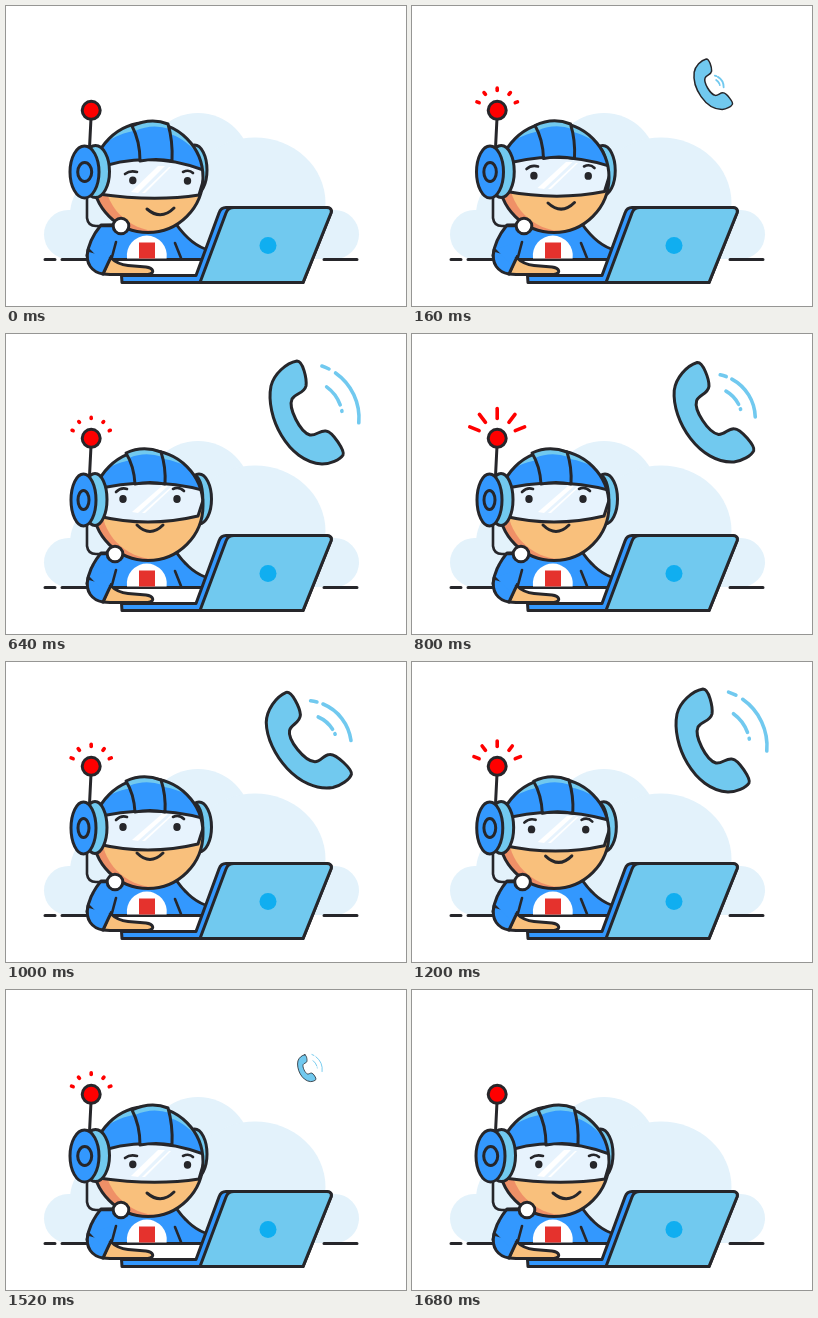
Recreate the animation shown at these times as an HTML page. Size 400 px wide and 300 px high, loop 1800 ms.

```html
<!DOCTYPE html>
<html lang="en">
<head>
<meta charset="utf-8">
<title>Incoming call</title>
<style>
  html, body { margin: 0; width: 100%; height: 100%; overflow: hidden; background: #fff; }
  svg { display: block; width: 400px; height: 300px; }
  .ink { stroke: #26262a; stroke-width: 3; stroke-linecap: round; stroke-linejoin: round; }
  .line { fill: none; }
  .blue { fill: #3398fe; }
  .sky { fill: #71c9ef; }
  .skin { fill: #f9c07c; }
  .shade { fill: #ef9067; }
  .white { fill: #fff; }
  .dark { fill: #26262a; }
  .visor { fill: #e7f3fd; }
  .thin { stroke-width: 2.6; }
  #cloud { fill: #e3f2fb; }
  #rays { stroke: #f00; stroke-width: 3.6; stroke-linecap: round; }
  #waves { fill: none; stroke: #71c9ef; stroke-width: 3.6; stroke-linecap: round; }
</style>
</head>
<body>
<svg viewBox="0 0 400 300">
  <defs>
    <clipPath id="headClip"><circle cx="142" cy="171.5" r="55"/></clipPath>
  </defs>

  <g id="cloud">
    <circle cx="192" cy="160" r="53"/>
    <ellipse cx="249" cy="197" rx="70.5" ry="65.5"/>
    <circle cx="109" cy="209" r="45"/>
    <rect x="38" y="204" width="315" height="49" rx="24.5"/>
    <path d="M105 165h150v88h-150z"/>
  </g>
  <path class="white" d="M90 253h140v20h-140z"/>
  <path class="ink line" d="M39 253.4h10M56 253.4h34M318 253.4h33"/>

  <g id="body">
    <path class="ink blue" d="M95 219C86 230 82 239 81 250L104 253.4H203V244C190 241 180 232 170 218Z"/>
    <path class="white" d="M121 252.4a20 20 0 1 1 39.6 0z"/>
    <rect x="133" y="236.5" width="16" height="16" fill="#e5322d"/>
    <path class="ink line thin" d="M110 236L106 251M169 237L175 252"/>
    <path class="ink skin" d="M97 268L104 251C110 257 116 259 122 259.5L140 261C147 262 150 267 142 268.5H104Z"/>
    <path class="ink blue" d="M82 244C79 258 86 266 97 268L105 251Z"/>
    <path class="blue" d="M84 243L105 236L104 250L98 258Z"/>
  </g>

  <g id="laptop">
    <path class="ink blue" d="M115.5 269.5H190L213 207Q215 201.6 220 201.6H321Q326.500 202 325 207L297 276.600H116Z"/>
    <path class="ink sky" d="M194 276.600L220 207Q222 201.6 228 201.6H321Q326.500 202 325 207L297 276.600Z"/>
    <circle cx="262" cy="239.5" r="8.5" fill="#10aef0"/>
  </g>

  <g id="head"></g>
  <g id="rays"></g>

  <g id="call">
    <g id="waves"></g>
    <path class="ink sky" d="M291 27C280 29 268 40 265 52C259 82 282 128 316 130C324 130 334 126 337 121C339 117 327 98 320 97C314 96 310 102 304 101C294 98 282 74 286 65C289 59 298 60 300 52C301 45 297 27 291 27Z"/>
  </g>
</svg>
<script>
const $ = id => document.getElementById(id);
const LOOP = 1800, STEP = 40;

// Eased value at time t from [time, value] keys.
function track(keys, t) {
  let i = 0;
  while (i < keys.length - 2 && t > keys[i + 1][0]) i++;
  const [t0, a] = keys[i], [t1, b] = keys[i + 1];
  const u = Math.min(1, Math.max(0, (t - t0) / (t1 - t0)));
  return a + (b - a) * u * u * (3 - 2 * u);
}

// Mixes two paths of equal structure; arc flags must stay plain 0 or 1.
function blend(front, turned, k) {
  const to = turned.match(/-?[\d.]+/g);
  let i = 0;
  return front.replace(/-?[\d.]+/g, n => Math.round((+n + (to[i++] - n) * k) * 100) / 100);
}

const ellipse = (cx, cy, rx, ry) =>
  `M${cx - rx} ${cy}A${rx} ${ry} 0 1 1 ${cx + rx} ${cy}A${rx} ${ry} 0 1 1 ${cx - rx} ${cy}Z`;

const skull = ellipse(142, 171.5, 55, 55);
const ridgeFront = 'M120 119Q137 111 155 118Q160 133 159 150Q144 147 129 150Q128 132 120 119Z';
const ridgeTurned = 'M126 120Q145 111 162 118Q167 135 166 155Q150 152 134 155Q134 135 126 120Z';

// [class, front path, turned path, clipped to the head]
const headParts = [
  ['ink sky', ellipse(193, 165, 12.5, 25), ellipse(188.5, 164, 12.5, 25)],
  ['ink blue thin', ellipse(188, 165, 9, 24), ellipse(183, 164, 9, 24)],
  ['ink line', 'M85 112L83.5 142', 'M85 112L83.5 142'],
  ['shade', skull, skull, true],
  ['skin', ellipse(149, 169, 54, 56), ellipse(152, 169, 54, 56), true],
  ['sky', 'M80 110H205V157Q142 141 80 157Z', 'M80 110H205V165Q141 142 80 165Z', true],
  ['blue', 'M80 157C96 116 188 110 200 157Q142 141 80 157Z',
           'M80 165C96 112 182 108 200 165Q141 142 80 165Z', true],
  ['ink visor', 'M84 157Q142 141 200 157L192 182Q142 194 92 182Z',
                'M84 165Q141 142 200 165L193 189Q148 196 92 188Z', true],
  ['white', 'M126 178L156 152H162L132 179Z', 'M125 186L152 160H159L132 187Z', true],
  ['white', 'M136 179L165 153H167L139 179Z', 'M136 187L163 161H165L139 187Z', true],
  ['ink line', skull, skull],
  ['blue', ridgeFront, ridgeTurned],
  ['sky', 'M120 119Q137 111 155 118L157 123Q139 117 123 124Z',
          'M126 120Q145 111 162 118L164 123Q146 117 129 125Z'],
  ['ink line', ridgeFront, ridgeTurned],
  ['dark', ellipse(117, 165, 3.7, 3.9), ellipse(126.8, 174.3, 3.7, 3.9)],
  ['dark', ellipse(171, 165, 3.7, 3.9), ellipse(181.5, 174.8, 3.7, 3.9)],
  ['ink line thin', 'M110 158Q115 153 121 155M167 155Q173 152 178 157',
                    'M119 168Q124 164 131 166M177 166Q183 163 187 167'],
  ['ink line', 'M131 191Q144 204 157 191', 'M141 203Q155 215 168 202'],
  ['ink sky', ellipse(89, 165.5, 12, 26), ellipse(89.5, 165.5, 14, 26)],
  ['ink blue', ellipse(77.5, 166, 12.5, 26), ellipse(78.5, 166, 14.5, 26)],
  ['ink line', ellipse(77.5, 166, 5.5, 9.5), ellipse(78.7, 166, 7, 9.5)],
  ['ink line thin', 'M81 192V212Q82 220 90 220H102', 'M81 192V212Q82 220 90 220H108'],
  ['ink white', ellipse(109, 220, 7.8, 7.8), ellipse(115, 220, 7.8, 7.8)],
];

$('head').innerHTML = headParts.map(([cls, , , clip]) =>
  `<g${clip ? ' clip-path="url(#headClip)"' : ''}><path class="${cls}"/></g>`).join('') +
  '<circle class="ink" cx="85.2" cy="104.3" r="9" fill="#f00"/>';
const headPaths = $('head').querySelectorAll('path');

const turnKeys = [[0, 1], [40, 1], [280, 0], [1120, 0], [1360, 1]];
const rayKeys = [[80, 0], [320, 11], [580, 0], [830, 11], [1080, 0], [1290, 10], [1360, 8.5], [1600, 0]];
const sizeKeys = [[40, 0], [280, 1], [1280, 1], [1640, 0]];
const tiltKeys = [[80, 0], [310, -14], [580, 0], [650, 0], [960, -14], [1080, -8], [1200, 0], [1360, 2]];
const waveKeys = [[80, 20], [320, 35], [600, 55], [640, 55], [940, 36], [1000, 46], [1200, 57], [1360, 62]];

const polar = (cx, cy, r, deg) => {
  const a = deg * Math.PI / 180;
  return `${(cx + r * Math.cos(a)).toFixed(2)} ${(cy + r * Math.sin(a)).toFixed(2)}`;
};
const arc = (r, from, to) => `M${polar(298, 84, r, from)}A${r} ${r} 0 0 1 ${polar(298, 84, r, to)}`;

function draw(t) {
  const turn = track(turnKeys, t);
  headParts.forEach(([, front, turned], i) => headPaths[i].setAttribute('d', blend(front, turned, turn)));

  const len = track(rayKeys, t);
  $('rays').innerHTML = len < .3 ? '' : [202, 233, 270, 307, 338].map(a =>
    `<path d="M${polar(85.2, 104, 19.5, a)}L${polar(85.2, 104, 19 + len, a)}"/>`).join('');

  const size = track(sizeKeys, t), r = track(waveKeys, t), inner = r * .7;
  $('call').style.display = size > .01 ? '' : 'none';
  $('call').setAttribute('transform',
    `translate(301 78) rotate(${track(tiltKeys, t)}) scale(${size}) translate(-301 -78)`);
  $('waves').innerHTML = `<path d="${arc(r, -71, -63)}${arc(r, -55, 5)}${arc(inner, -54, -20)}${arc(inner, -11, -10)}"/>`;
}

const start = performance.now();
function frame() {
  const t = (performance.now() - start) % LOOP;
  draw(Math.min(1680, Math.floor(t / STEP) * STEP));
  requestAnimationFrame(frame);
}
frame();
</script>
</body>
</html>
```
